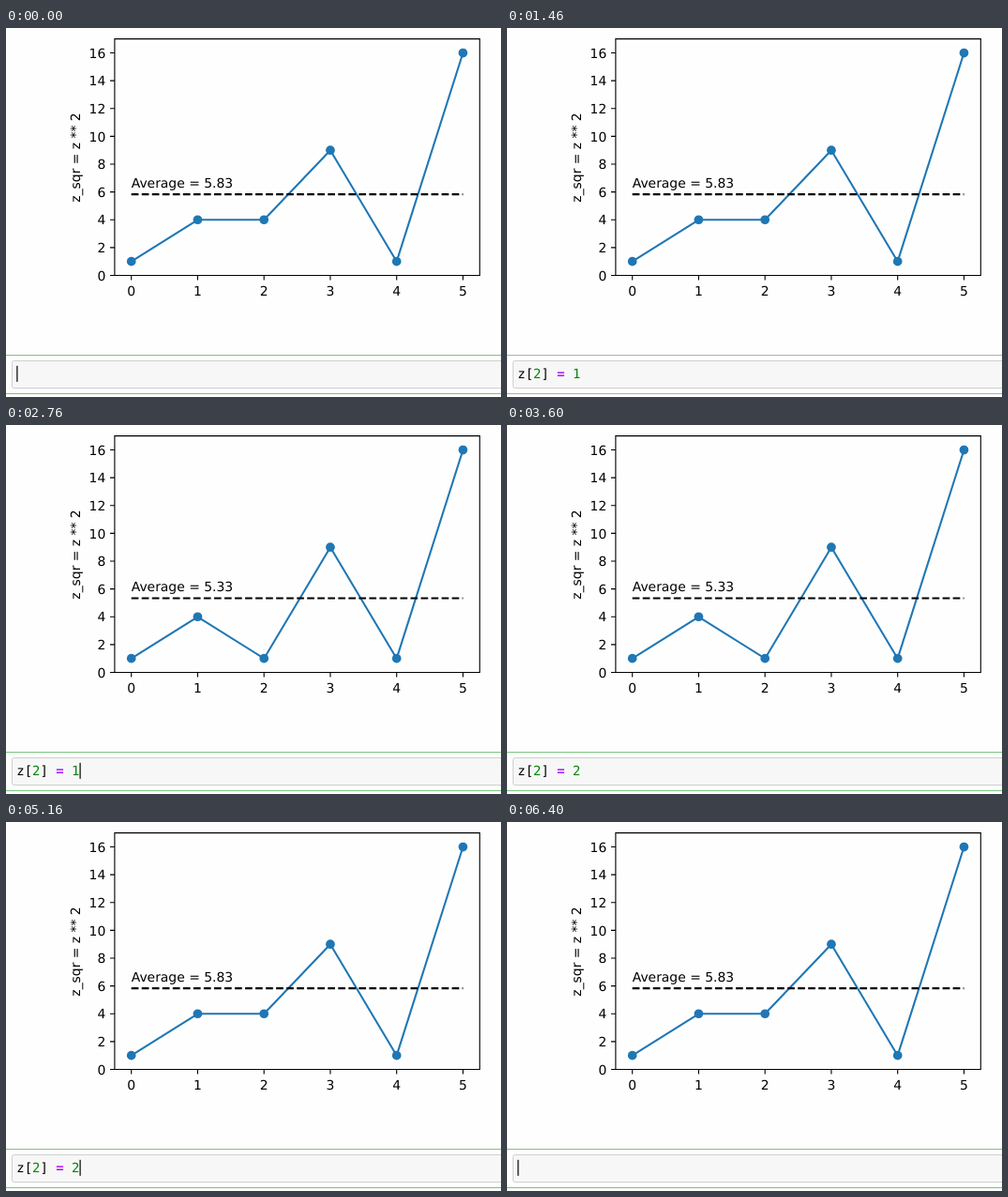
An HTML page for the animation above (6.6 s loop, 528 px wide and 393 px high).

```html
<!DOCTYPE html>
<html lang="en">
<head>
<meta charset="utf-8">
<title>Live plot</title>
<style>
  html, body { margin: 0; width: 100%; height: 100%; overflow: hidden; background: #fefefe; }
  svg { display: block; width: 528px; height: 393px; }
  text { text-rendering: geometricPrecision; white-space: pre; }
  .chart text { font: 13.9px "DejaVu Sans", sans-serif; }
  .axes { fill: none; stroke: #000; stroke-width: 1.11; }
  .series { fill: none; stroke: #1f77b4; stroke-width: 2.08; stroke-linejoin: round; }
  .dots { fill: #1f77b4; }
  .average { stroke: #000; stroke-width: 2.08; stroke-dasharray: 7.7 3.33; }
  .code { font: 13.95px "DejaVu Sans Mono", monospace; }
  .number { fill: #080; }
  .operator { fill: #a2f; font-weight: bold; }
  .cell { stroke: #b0b0b0; }
  .cell.editing { stroke: #7bc47f; }
  .field { fill: #f7f7f7; stroke: #cfcfcf; }
  .selection { fill: #d7d4f0; }
</style>
</head>
<body>
<svg viewBox="0 0 528 393">
  <g class="chart">
    <path class="axes"/>
    <g class="labels"></g>
    <text transform="translate(79.2 138) rotate(-90)" text-anchor="middle">z_sqr = z ** 2</text>
    <path class="series"/>
    <g class="dots"></g>
    <path class="average"/>
    <text class="caption"></text>
  </g>
  <path class="cell" d="M0 348.5H528M0 389.5H528"/>
  <rect class="field" x="6.5" y="354.5" width="540" height="29" rx="2"/>
  <rect class="selection" y="359.8" height="17"/>
  <text class="code" x="11.3" y="373.1"></text>
  <rect class="cursor" y="359.8" width="1.2" height="17"/>
</svg>
<script>
const LOOP = 6600;
const CODE_X = 11.3, CHAR_W = 8.4;
const $ = selector => document.querySelector(selector);
const plotX = i => 133.7 + 70.75 * i;
const plotY = v => 263.5 - 14.81 * v;

function add(parent, name, attrs, content = '') {
  const node = document.createElementNS('http://www.w3.org/2000/svg', name);
  for (const key in attrs) node.setAttribute(key, attrs[key]);
  node.textContent = content;
  parent.append(node);
  return node;
}

function drawAxes() {
  const left = 115.9, right = 505.3, top = 11.6, bottom = plotY(0), tick = 4.9;
  let path = `M${left} ${top}H${right}V${bottom}H${left}Z`;
  for (let i = 0; i <= 5; i++) {
    path += `M${plotX(i)} ${bottom}v${tick}`;
    add($('.labels'), 'text', { x: plotX(i), y: 284.5, 'text-anchor': 'middle' }, i);
  }
  for (let v = 0; v <= 16; v += 2) {
    path += `M${left} ${plotY(v)}h${-tick}`;
    add($('.labels'), 'text', { x: 106.3, y: plotY(v) + 5.2, 'text-anchor': 'end' }, v);
  }
  $('.axes').setAttribute('d', path);
}

function drawPlot(z2) {
  const values = [-1, 2, z2, 3, 1, 4].map(z => z * z);
  const mean = values.reduce((a, b) => a + b) / values.length;
  $('.series').setAttribute('d', 'M' + values.map((v, i) => `${plotX(i)} ${plotY(v)}`).join('L'));
  $('.dots').replaceChildren();
  values.forEach((v, i) => add($('.dots'), 'circle', { cx: plotX(i), cy: plotY(v), r: 4.85 }));
  $('.average').setAttribute('d', `M${plotX(0)} ${plotY(mean)}H${plotX(5)}`);
  const caption = $('.caption');
  caption.setAttribute('x', plotX(0));
  caption.setAttribute('y', plotY(mean + 0.5));
  caption.textContent = `Average = ${mean.toFixed(2)}`;
}

// [start, code, cursor column or -1, options]
const steps = [
  [0, '', 0],
  [60, '', -1],
  [260, 'z', 1],
  [400, 'z[]', 2],
  [490, 'z[2]', 3],
  [570, 'z[2]', 4],
  [660, 'z[2] ', 5],
  [830, 'z[2] =', 6],
  [930, 'z[2] = ', 7],
  [1130, 'z[2] = 1', 8],
  [1430, 'z[2] = 1', -1, { idle: true }],
  [1465, 'z[2] = 1', -1, { idle: true, z2: 1 }],
  [2760, 'z[2] = 1', 8, { z2: 1 }],
  [3030, 'z[2] = 1', -1, { z2: 1 }],
  [3300, 'z[2] = ', 7, { z2: 1 }],
  [3330, 'z[2] = 2', 8, { z2: 1 }],
  [3600, 'z[2] = 2', -1, { z2: 1 }],
  [3830, 'z[2] = 2', -1, { z2: 1, idle: true }],
  [3860, 'z[2] = 2', -1, { idle: true }],
  [5160, 'z[2] = 2', 8],
  [5300, 'z[2] = 2', -1, { selectFrom: 5 }],
  [5400, 'z[2] = 2', -1, { selectFrom: 0 }],
  [5860, '', 0],
  [6130, '', -1],
  [6400, '', 0]
];

function drawCode(code) {
  const line = $('.code');
  line.replaceChildren();
  for (const token of code.match(/\d+|=|[^\d=]+/g) || []) {
    const kind = /\d/.test(token) ? 'number' : token === '=' ? 'operator' : 'plain';
    add(line, 'tspan', { class: kind }, token);
  }
}

function show([, code, column, { idle = false, z2 = 2, selectFrom = code.length } = {}]) {
  drawCode(code);
  drawPlot(z2);
  $('.cell').classList.toggle('editing', !idle);
  $('.cursor').setAttribute('x', CODE_X + CHAR_W * column);
  $('.cursor').setAttribute('visibility', column < 0 ? 'hidden' : 'visible');
  $('.selection').setAttribute('x', CODE_X + CHAR_W * selectFrom);
  $('.selection').setAttribute('width', CHAR_W * (code.length - selectFrom));
}

let current;
function frame() {
  const time = performance.now() % LOOP;
  const step = steps.findLast(([start]) => start <= time);
  if (step !== current) show(current = step);
  requestAnimationFrame(frame);
}

drawAxes();
frame();
</script>
</body>
</html>
```
